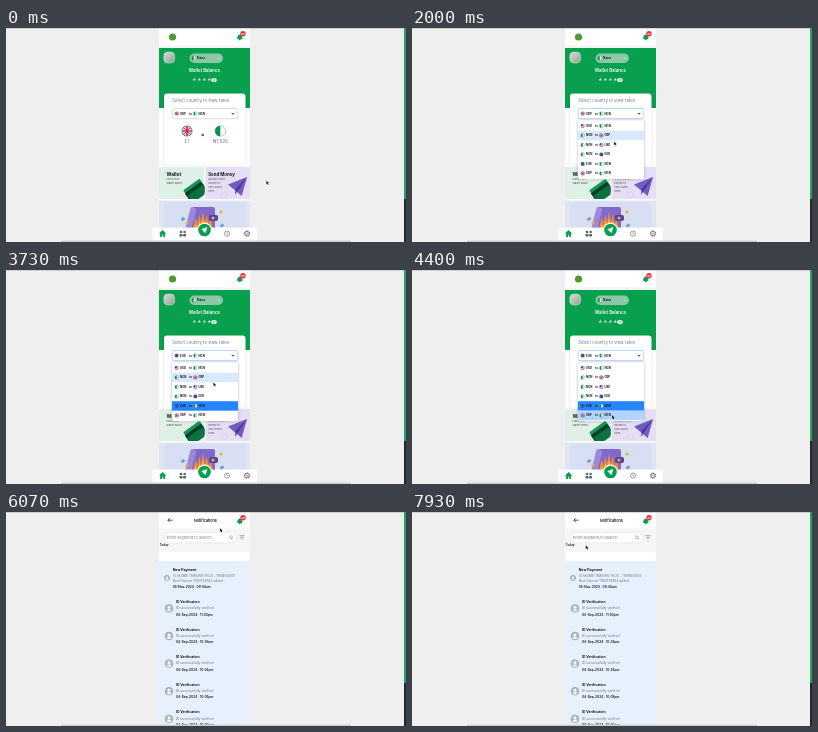
An HTML page with a canvas that plays this animation: 400x214 px, repeating every 8 s.

```html
<!DOCTYPE html>
<html lang="en">
<head>
<meta charset="utf-8">
<title>Wallet rates</title>
<style>
html,body{margin:0;width:100%;height:100%;overflow:hidden;background:#efefef}
canvas{display:block;width:400px;height:214px}
</style>
</head>
<body>
<canvas id="stage"></canvas>
<script>
const LOOP = 8000, LEFT = 153, WIDE = 91;
const GREEN = '#08a04e', INK = '#15151d', SLATE = '#70758c', ICON = '#5d6165', BLUE = '#2684ff';
const canvas = document.getElementById('stage');
const dpr = window.devicePixelRatio || 1;
canvas.width = 400 * dpr;
canvas.height = 214 * dpr;
const c = canvas.getContext('2d');

function paint(fill, stroke, lw) {
  if (fill) { c.fillStyle = fill; c.fill(); }
  if (stroke) { c.strokeStyle = stroke; c.lineWidth = lw; c.stroke(); }
}
function rect(x, y, w, h, fill) {
  c.fillStyle = fill;
  c.fillRect(x, y, w, h);
}
function round(x, y, w, h, r, fill, stroke, lw = 0.6) {
  c.beginPath();
  c.roundRect(x, y, w, h, r);
  paint(fill, stroke, lw);
}
function dot(x, y, r, fill, stroke, lw = 0.6) {
  c.beginPath();
  c.arc(x, y, r, 0, 7);
  paint(fill, stroke, lw);
}
function poly(pts, fill, stroke, lw) {
  c.beginPath();
  for (let i = 0; i < pts.length; i += 2) c.lineTo(pts[i], pts[i + 1]);
  c.closePath();
  paint(fill, stroke, lw);
}
function line(x1, y1, x2, y2, stroke, lw = 0.7) {
  c.beginPath();
  c.moveTo(x1, y1);
  c.lineTo(x2, y2);
  paint(null, stroke, lw);
}
function chevron(x, y, s, color, lw) {
  line(x - s, y - s / 2, x, y + s / 2, color, lw);
  line(x, y + s / 2, x + s, y - s / 2, color, lw);
}
// Rounded box turned about its centre.
function tilt(x, y, w, h, angle, fill) {
  c.save();
  c.translate(x, y);
  c.rotate(angle);
  round(-w / 2, -h / 2, w, h, 1, fill);
  c.restore();
}
function shadow(color, blur, draw) {
  c.save();
  c.shadowColor = color;
  c.shadowBlur = blur * dpr;
  draw();
  c.restore();
}
// Text is set large and scaled down so tiny sizes keep true metrics.
function text(s, x, y, size, fill = INK, weight = 400, align = 'left') {
  c.save();
  c.translate(x, y);
  c.scale(0.1, 0.1);
  c.font = `${weight} ${size * 10}px Inter, "Noto Sans", sans-serif`;
  c.textAlign = align;
  c.fillStyle = fill;
  c.fillText(s, 0, 0);
  c.restore();
}

function flag(code, x, y, r) {
  const l = x - r, t = y - r, d = r * 2;
  c.save();
  c.beginPath();
  c.arc(x, y, r, 0, 7);
  c.clip();
  if (code === 'NGN') {
    rect(l, t, d, d, '#f5f8f5');
    rect(l, t, r, d, '#0b8f4a');
  } else if (code === 'EUR') {
    rect(l, t, d, d, '#17399b');
    for (let a = 0; a < 6.2; a += Math.PI / 6)
      dot(x + Math.cos(a) * r * 0.62, y + Math.sin(a) * r * 0.62, r * 0.12, '#d9cf50');
  } else if (code === 'USD') {
    for (let i = 0; i < 7; i++) rect(l, t + i * d / 7, d, d / 7, i % 2 ? '#fff' : '#c62a42');
    rect(l, t, r, r, '#27356f');
  } else {
    rect(l, t, d, d, '#22366f');
    for (const [col, k] of [['#fff', r * 0.5], ['#cf2740', r * 0.25]]) {
      line(l, t, l + d, t + d, col, k * 0.7);
      line(l + d, t, l, t + d, col, k * 0.7);
      line(l, y, l + d, y, col, k * 1.3);
      line(x, t, x, t + d, col, k * 1.3);
    }
  }
  c.restore();
  dot(x, y, r, null, code === 'NGN' ? '#27955a' : '#555d7d', 0.35);
}
function pair(from, to, y) {
  flag(from, 170.7, y, 1.9);
  text(from, 174, y + 1, 2.8, INK, 700);
  text('to', 183.2, y + 1, 2.8, INK, 700);
  flag(to, 189.3, y, 1.9);
  text(to, 192.4, y + 1, 2.8, INK, 700);
}
function bell() {
  dot(233.8, 8.4, 2, GREEN);
  round(231.2, 8.6, 5.2, 2.6, 0.8, GREEN);
  dot(233.8, 11.6, 0.8, GREEN);
  dot(237, 5.8, 2.7, '#e7323b');
  text('20', 237, 6.8, 2.6, '#fff', 700, 'center');
}
function plane(x, y, s, light, dark) {
  poly([x, y + s * 0.4, x + s, y, x + s * 0.72, y + s], light);
  poly([x + s, y, x + s * 0.42, y + s * 0.6, x + s * 0.36, y + s * 0.95], dark);
}

function home(t) {
  rect(LEFT, 0, WIDE, 214, '#fff');
  rect(LEFT, 17.5, WIDE, 2.5, '#f3f4f4');
  dot(166.5, 9, 3.6, '#4f9a35');
  bell();
  wallet();
  rates(t);
  tiles();
  banner();
  if (isOpen(t)) menu(t);
  nav();
}

function wallet() {
  rect(LEFT, 20, WIDE, 60, GREEN);
  const g = c.createLinearGradient(158, 24, 168, 35);
  g.addColorStop(0, '#dadcd2');
  g.addColorStop(1, '#8fa294');
  round(157.8, 24, 10.8, 11, 4, g, '#c9dfd1');
  round(183.5, 25.5, 33.5, 9.5, 4.7, '#8cc8a6');
  flag('NGN', 187.7, 30.2, 2.2);
  text('Naira', 191, 31.3, 3.2, '#0d2417', 600);
  chevron(213, 30.2, 1, '#e9fff2', 0.6);
  text('Wallet Balance', 198.5, 43.5, 4.4, '#fff', 600, 'center');
  for (let i = 0; i < 4; i++) text('★', 188.3 + i * 5, 53.4, 4, '#e4f6ec', 400, 'center');
  c.beginPath();
  c.ellipse(208, 52, 2.8, 2, 0, 0, 7);
  paint('#e4f6ec');
  dot(208, 52, 0.9, '#6dc191');
}

const isOpen = t => (t >= 1530 && t < 2530) || (t >= 3400 && t < 4470);
const isEuro = t => t >= 2530 && t < 4470;

function rates(t) {
  const euro = isEuro(t), code = euro ? 'EUR' : 'GBP';
  shadow('rgba(0,0,0,.14)', 3, () => round(158, 65.5, 81.5, 72, 3, '#fff'));
  text('Select country to view rates', 166.3, 74.2, 4.3, SLATE);
  round(166.2, 80.5, 65.6, 10.2, 2, '#fff', t >= 1530 && t < 4800 ? '#8dbafa' : '#c3c3c8');
  pair(code, 'NGN', 85.6);
  chevron(227, 85.6, 1.3, INK, 0.9);
  flag(code, 181, 103, 5.3);
  flag('NGN', 214.3, 103, 5.3);
  for (const y of [106.3, 107.6]) line(195.4, y, 198, y, INK, 0.7);
  text(euro ? '€1' : '£1', 180.8, 114.8, 4.5, SLATE, 400, 'center');
  text(euro ? '₦1,600' : '₦1,926', 214.5, 114.8, 4.5, SLATE, 400, 'center');
}

function clipTo(x, y, w, h, draw) {
  c.save();
  c.beginPath();
  c.rect(x, y, w, h);
  c.clip();
  draw();
  c.restore();
}
function tile(x, w, fill, title, size, lines, art) {
  clipTo(x, 139, w, 32, () => {
    rect(x, 139, w, 32, fill);
    art();
    text(title, x + 7.5 - (x > 190 ? 4.5 : 0), 147.6, size, INK, 700);
    lines.forEach((s, i) => text(s, x + 7.5 - (x > 190 ? 4.5 : 0), 152 + i * 4, 2.7, '#474d50'));
  });
}
function tiles() {
  tile(LEFT, 45.5, '#dff1e6', 'Wallet', 4.8, ['Fund your', 'wallet easily'], () => {
    tilt(188.5, 161, 20, 11, -0.62, '#159655');
    tilt(190, 164, 20, 11, -0.62, '#083d27');
    tilt(191.5, 166, 18, 9, -0.62, '#0b7140');
  });
  tile(199.2, 44.8, '#e6def5', 'Send Money', 4.4, ['Quickly send', 'money to', 'your loved', 'ones'], () => {
    plane(222, 149, 19, '#6f5cc0', '#4a35a0');
    c.setLineDash([1, 1]);
    dot(218, 167, 3, null, '#b4a6d8', 0.4);
    c.setLineDash([]);
  });
}

function banner() {
  rect(LEFT, 172.5, WIDE, 30, '#dfe5f2');
  round(158, 174, 81.5, 32, 4, '#d9dff3');
  round(186, 179, 23, 25, 2, '#8168cb');
  tilt(185, 190, 6, 21, 0.25, '#9c8ad8');
  // Flame: a few tongues, tallest in the middle.
  for (let i = -2; i <= 2; i++) {
    const x = 197 + i * 3.6, top = 183 + Math.abs(i) * 3.2;
    poly([x - 3, 201, x, top, x + 3, 201], '#f08b38');
    poly([x - 1.6, 201, x, top + 7, x + 1.6, 201], '#ffc950');
  }
  round(203, 187, 9, 6, 2, '#57439c');
  for (const [x, y] of [[181, 195], [207, 190], [215, 184]]) dot(x, y, 1.6, '#edae3b');
  for (const x of [177, 216]) tilt(x, 191 + (x - 177) / 6, 4, 3, -0.6, '#6fa3d4');
}

function nav() {
  rect(146.5, 199.6, 104.5, 14.4, '#fff');
  poly([152.9, 205.6, 156.6, 202, 160.3, 205.6], GREEN);
  rect(154.1, 205, 5, 4, GREEN);
  rect(156, 206.8, 1.2, 2.2, '#fff');
  for (const x of [175, 178.6]) {
    dot(x, 204, 1.3, ICON);
    round(x - 1.6, 206, 3.2, 2.5, 1, ICON);
  }
  dot(198.5, 202, 7.4, '#fff');
  dot(198.5, 202, 6.3, GREEN);
  plane(195.3, 198.9, 6, '#fff', '#b8ddc7');
  dot(221, 205.6, 2.6, null, ICON);
  line(221, 203.8, 221, 206, ICON, 0.5);
  line(221, 206, 222.3, 206, ICON, 0.5);
  dot(241, 205.6, 2.3, null, ICON, 0.8);
  c.setLineDash([1, 1.2]);
  dot(241, 205.6, 2.8, null, ICON, 0.8);
  c.setLineDash([]);
  dot(241, 205.6, 0.8, null, ICON, 0.5);
}

const OPTIONS = ['USD NGN', 'NGN GBP', 'NGN USD', 'NGN EUR', 'EUR NGN', 'GBP NGN'];
const ROW = 9.5, TOP = 93.2;
function menu(t) {
  shadow('rgba(0,0,0,.3)', 3, () => round(166, 92.3, 66, 59, 2, '#fff'));
  // The highlight trails the pointer slightly.
  const hover = Math.max(0, Math.min(5, Math.floor((pointer(t - 70)[1] - TOP) / ROW)));
  OPTIONS.forEach((o, i) => {
    const y = TOP + i * ROW;
    if (isEuro(t) && i === 4) rect(166, y, 66, ROW, BLUE);
    else if (i === hover) rect(166, y, 66, ROW, t >= 4330 ? '#b2d4ff' : '#d9e8fb');
    pair(...o.split(' '), y + ROW / 2);
  });
}

function person(x, y, r) {
  dot(x, y, r, '#b4bac3', '#8d949e', 0.5);
  dot(x, y - r * 0.25, r * 0.35, '#fff');
  c.beginPath();
  c.arc(x, y + r * 0.75, r * 0.55, Math.PI, 0);
  c.fill();
}

function notices() {
  rect(LEFT, 0, WIDE, 214, '#f6f6f7');
  rect(LEFT, 0, WIDE, 16.5, '#fff');
  line(166.7, 8.2, 161.8, 8.2, INK);
  for (const s of [-2, 2]) line(161.8, 8.2, 163.8, 8.2 + s, INK);
  text('Notifications', 199.4, 10.2, 3.7, INK, 600, 'center');
  bell();
  round(158.3, 20.3, 72.5, 10.6, 4, '#fff', '#dcdde2');
  text('Enter keyword to search', 160.8, 27.1, 3.9, '#777b86');
  dot(225, 25.2, 1.4, null, '#777b86', 0.5);
  line(226, 26.2, 227.1, 27.3, '#777b86', 0.5);
  for (let i = 0; i < 3; i++) line(233.4 + i * 0.9, 23.7 + i * 1.7, 238.6 - i * 0.9, 23.7 + i * 1.7, '#70737c', 0.6);
  text('Today', 153.7, 34.4, 3, INK, 600);

  round(LEFT, 40, WIDE, 20, 3, '#fff');
  rect(LEFT, 49, WIDE, 165, '#e7f1fd');
  person(161, 66, 2.7);
  text('New Payment', 166.7, 58.6, 3.5, INK, 700);
  text('OLAKUNBI TEMIDARE FELIX - TRANS44607', 166.7, 65, 3, SLATE);
  text('New Deposit TRX0154844 added', 166.7, 70, 3.2, SLATE);
  text('05-Nov-2024 : 09:44am', 166.7, 76.4, 3.2, INK, 600);
  ['11:03pm', '10:36pm', '10:24pm', '10:08pm', '10:00pm'].forEach((time, i) => {
    const y = 91 + i * 27.6;
    person(163, y + 5.4, 3.9);
    text('ID Verification', 170, y, 3.4, INK, 700);
    text('ID successfully verified', 170, y + 6.2, 3.4, SLATE);
    text('04-Sep-2024 : ' + time, 170, y + 12.5, 3.2, INK, 600);
  });
}

// Pointer moves: start, end, x, y
const MOVES = [
  [800, 801, 213, 87], [1670, 2470, 194, 133], [2900, 3330, 213, 87],
  [3530, 4200, 200, 145], [4600, 5460, 233, 8.5], [5930, 6070, 214, 16],
  [6070, 6730, 165, 8], [7270, 7930, 173.7, 33.2]
];
function pointer(t) {
  let x = 260.3, y = 152.5;
  for (const [from, to, tx, ty] of MOVES) {
    const k = Math.max(0, Math.min(1, (t - from) / (to - from)));
    const e = 1 - (1 - k) ** 1.6;
    x += (tx - x) * e;
    y += (ty - y) * e;
  }
  return [x, y];
}
function arrow([x, y]) {
  line(x + 1, y + 2, x + 1.9, y + 4.2, '#111', 0.9);
  poly([x, y, x, y + 3.7, x + 2.6, y + 2.6], '#111', 'rgba(255,255,255,.6)', 0.3);
}

function draw(now) {
  const t = now % LOOP;
  c.setTransform(dpr, 0, 0, dpr, 0, 0);
  rect(0, 0, 400, 214, '#efefef');
  if (t < 5800) home(t); else notices();
  rect(0, 0, 400, 0.6, '#bdbdbd');
  rect(398, 0, 2, 171, '#20a65b');
  rect(398, 171, 2, 43, '#25272a');
  round(55, 212.4, 290, 4, 1, '#cfcfd0');
  arrow(pointer(t));
  requestAnimationFrame(draw);
}
requestAnimationFrame(draw);
</script>
</body>
</html>
```
